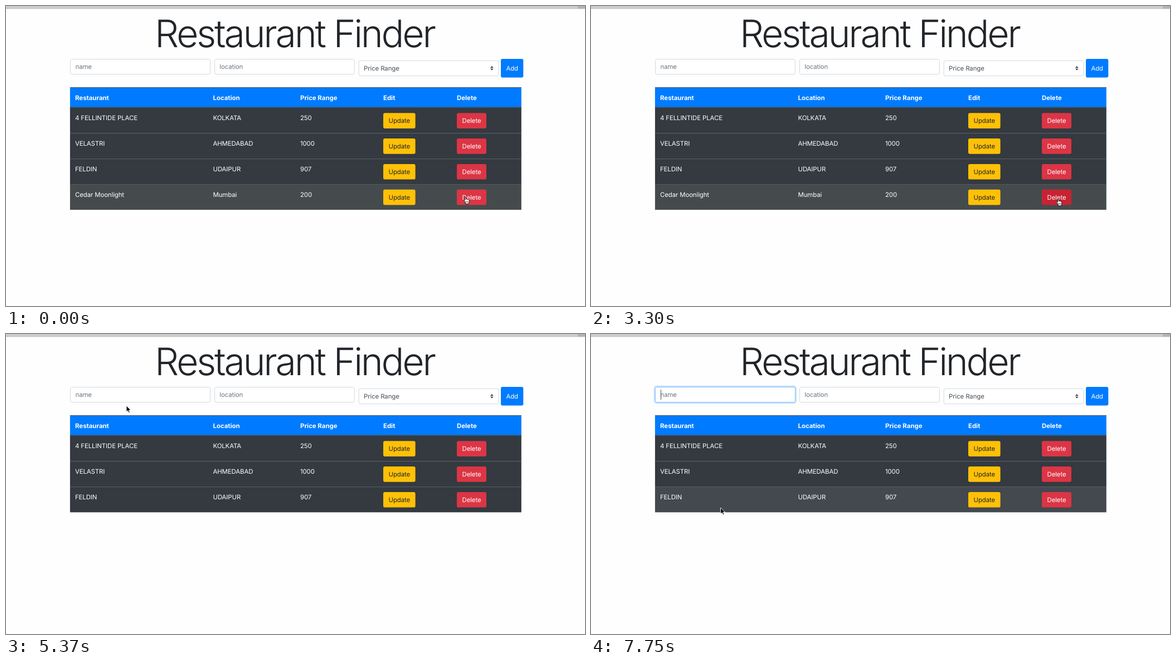
An HTML page that plays this animation: 1039 by 539 pixels, repeating every 8000 ms.

```html
<!DOCTYPE html>
<html lang="en">
<head>
<meta charset="utf-8">
<title>Restaurant Finder</title>
<style>
  html, body { margin: 0; width: 100%; height: 100%; overflow: hidden; background: #fefefe; }
  svg { display: block; width: 100%; height: 100%; }
  text {
    font-family: Inter, Roboto, "Liberation Sans", sans-serif;
    font-size: 11.4px;
    letter-spacing: -0.1px;
    font-optical-sizing: none;
    text-rendering: geometricPrecision;
  }
  .title { font-size: 68px; font-weight: 300; letter-spacing: -0.0475em; }
  .head { font-weight: 700; letter-spacing: 0; }
</style>
</head>
<body>
<svg id="stage" viewBox="0 0 1039 539" xmlns="http://www.w3.org/2000/svg"></svg>
<script>
const LOOP = 8000;
const stage = document.getElementById('stage');

function add(tag, attrs, parent = stage) {
  const el = document.createElementNS('http://www.w3.org/2000/svg', tag);
  for (const key in attrs) el.setAttribute(key, attrs[key]);
  parent.appendChild(el);
  return el;
}
const rect = (x, y, width, height, fill, more = {}, parent) =>
  add('rect', { x, y, width, height, fill, ...more }, parent);

function label(x, y, str, fill, more = {}, parent) {
  const el = add('text', { x, y, fill, ...more }, parent);
  el.textContent = str;
  return el;
}
const show = (el, on) => el.setAttribute('visibility', on ? 'visible' : 'hidden');

function button(x, y, width, height, fill, str, color, parent) {
  const box = rect(x, y, width, height, fill, { rx: 2.9 }, parent);
  label(x + width / 2, y + height / 2 + 4.1, str, color, { 'text-anchor': 'middle' }, parent);
  return box;
}
const field = (x, y) =>
  rect(x + 0.36, y + 0.36, 250.8, 27, '#fff', { rx: 2.7, stroke: '#ced4da', 'stroke-width': 0.9 });

// Window edge and title
rect(0, 0, 1039, 4.6, '#cdcdcd');
rect(0, 4.2, 1039, 1, '#b9b9b9');
rect(1026, 0, 13, 5, '#b4b4b4');
label(517.8, 74, 'Restaurant Finder', '#212529', { class: 'title', 'text-anchor': 'middle' });

// Form
const glow = rect(114, 94, 253.6, 29.8, 'none',
  { rx: 4, stroke: '#007bff', 'stroke-opacity': 0.25, 'stroke-width': 2.4 });
const nameField = field(115.2, 95.2);
field(374.2, 95.2);
field(632.9, 98);
label(124.5, 113, 'name', '#6c757d');
label(383.3, 113, 'location', '#6c757d');
label(642, 116, 'Price Range', '#495057');
add('path', { d: 'M2 0L0 2h4zm0 5L0 3h4z', fill: '#343a40', transform: 'translate(868.9 108.1) scale(1.458)' });
button(888, 95, 40.3, 33.5, '#007bff', 'Add', '#fff');
const caret = rect(125, 100, 1, 18, '#495057');

// Table
const COLUMNS = [124, 371.5, 528, 677, 809];
const LEFT = 114.9, WIDTH = 809.9, ROW_TOP = 182.8, ROW_H = 45.85;
rect(LEFT, 146, WIDTH, 37, '#007bff');
rect(LEFT, 146, WIDTH, 1, '#454d55');
['Restaurant', 'Location', 'Price Range', 'Edit', 'Delete'].forEach((str, i) =>
  label(COLUMNS[i], 168.8, str, '#fff', { class: 'head' }));

const rows = [
  ['4 FELLINTIDE PLACE', 'KOLKATA', '250'],
  ['VELASTRI', 'AHMEDABAD', '1000'],
  ['FELDIN', 'UDAIPUR', '907'],
  ['Cedar Moonlight', 'Mumbai', '200']
].map((cells, i) => {
  const top = ROW_TOP + i * ROW_H;
  const group = add('g', {});
  const back = rect(LEFT, top, WIDTH, ROW_H, '#343a40', {}, group);
  rect(LEFT, top - (i ? 0 : 1.4), WIDTH, i ? 0.8 : 1.5, '#454d55', {}, group);
  cells.forEach((str, c) => label(COLUMNS[c], top + 22.5, str, '#fff', {}, group));
  button(677, top + 9.4, 57.6, 27.7, '#ffc107', 'Update', '#212529', group);
  const remove = button(809, top + 9.4, 53, 27.7, '#dc3545', 'Delete', '#fff', group);
  return { group, back, remove, top };
});

// Pointers, each with its hot spot at the origin
const hand = add('g', {});
add('path', {
  d: 'M3 8.2L1 6C.2 5 1.2 4.2 2 5L3.2 6.2V1.2C3.2 0 5 0 5 1.2V4.2C5.2 3.4 6.7 3.5 6.7 4.6' +
     'C7 3.9 8.4 4.1 8.4 5.1C8.8 4.5 10 4.8 10 5.8V8.5C10 10 9.2 10.6 9 12.6H4.2C4.2 11 3.4 9.6 3 8.2Z',
  fill: '#fff', stroke: '#000', 'stroke-width': 0.9, 'stroke-linejoin': 'round',
  transform: 'translate(-4.8 0) scale(1.1 1)'
}, hand);
add('path', { d: 'M.8 7.6v2.8M2.4 7.6v2.8M4 7.6v2.8', stroke: '#000', 'stroke-width': 0.6 }, hand);

const arrow = add('g', {});
add('path', {
  d: 'M0 0V11.2L2.6 8.8L4.3 12.7L6.2 11.9L4.6 8.1H8Z',
  fill: '#000', stroke: '#fff', 'stroke-width': 0.9, 'stroke-linejoin': 'round'
}, arrow);

const beam = add('g', {});
add('path', {
  d: 'M-2.6-6.2Q0-6.2 0-4.6Q0-6.2 2.6-6.2M0-5V5M-2.6 6.2Q0 6.2 0 4.6Q0 6.2 2.6 6.2M-1.4 2H1.4',
  fill: 'none', stroke: '#000', 'stroke-width': 1
}, beam);

// Pointer samples: time, x, y, shape; each holds until the next
const PATH = [
  [0, 825, 343, hand], [2100, 827, 344, hand], [2250, 831, 345, hand],
  [2400, 836, 346, hand], [2550, 839.5, 346.4, hand], [3150, 839, 346.4, hand],
  [3300, 838.6, 346.4, hand], [4630, 786, 336, arrow], [4780, 540, 268, arrow],
  [4930, 270, 184, arrow], [5070, 143, 146, arrow], [5220, 178, 138, arrow],
  [5370, 216, 128.8, arrow], [5520, 222, 114, beam], [5660, 224, 110.5, beam],
  [7010, 226, 134, arrow], [7160, 229, 236, arrow], [7310, 231.5, 292, arrow],
  [7450, 232.5, 312, arrow]
];
const CARET_ON = [[5810, 6260], [6860, 7310], [7750, LOOP]];
const REMOVED = 4330, FOCUS = 5810, FOCUSED = 5960;

function draw(t) {
  const [, x, y, shape] = PATH.filter(p => p[0] <= t).pop();
  for (const p of [hand, arrow, beam]) show(p, p === shape);
  shape.setAttribute('transform', `translate(${x} ${y})`);

  const count = t < REMOVED ? 4 : 3;
  rows.forEach((row, i) => {
    const hover = i < count && y >= row.top && y < row.top + ROW_H;
    row.group.setAttribute('display', i < count ? 'inline' : 'none');
    row.back.setAttribute('fill', hover ? (i === 3 ? '#454b4d' : '#43494e') : '#343a40');
  });
  rows[3].remove.setAttribute('fill', t < 150 ? '#dc3545' : '#c82333');

  const focus = t < FOCUS ? 0 : t < FOCUSED ? 0.5 : 1;
  glow.setAttribute('opacity', focus);
  nameField.setAttribute('stroke', ['#ced4da', '#a7caed', '#80bdff'][focus * 2]);
  show(caret, CARET_ON.some(([from, to]) => t >= from && t < to));
}

const start = performance.now();
function tick() {
  draw((performance.now() - start) % LOOP);
  requestAnimationFrame(tick);
}
draw(0);
requestAnimationFrame(tick);
</script>
</body>
</html>
```
